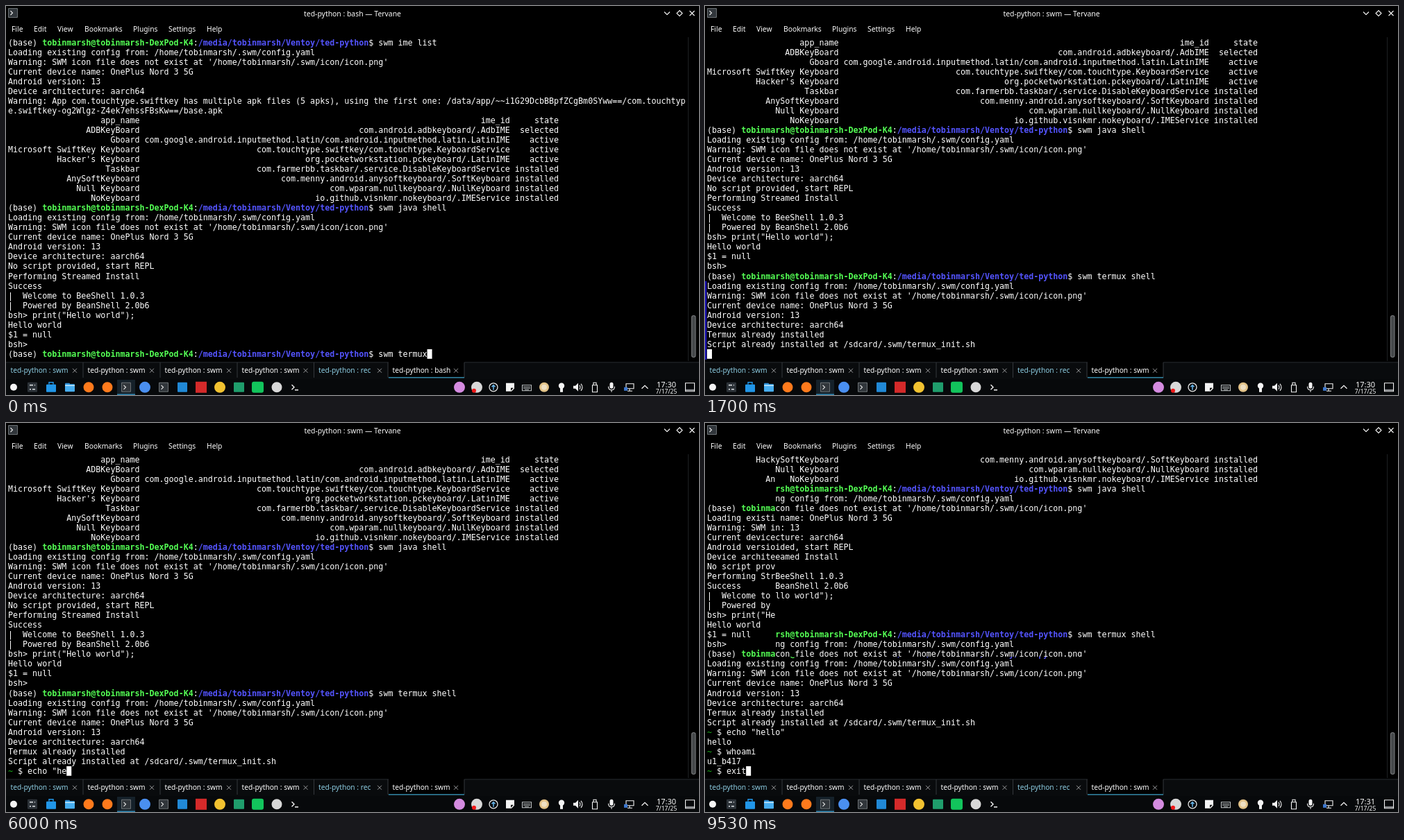
Write an HTML page with a canvas that moves like this. It is 998 px wide and 561 px high and loops after 9560 ms.

```html
<!DOCTYPE html>
<html lang="en">
<head>
<meta charset="utf-8">
<title>Terminal session</title>
<style>
  html, body { margin: 0; width: 100%; height: 100%; overflow: hidden; background: #000; }
  canvas { display: block; }
</style>
</head>
<body>
<canvas id="stage" width="998" height="561"></canvas>
<script>
const LOOP = 9560;
const W = 998, H = 561;
const ctx = document.getElementById('stage').getContext('2d');

const MONO = '"DejaVu Sans Mono", "Liberation Mono", monospace';
const SANS = '"Noto Sans", "Open Sans", sans-serif';
const CELL = 7.018, ROW = 14.03, LEFT = 3, TOP = 46, ROWS = 33;

// ---------- session text ----------
const USER = 'tobinmarsh', HOST = USER + '-DexPod-K4';
const CWD = '/media/' + USER + '/Ventoy/ted-python';
const prompt = cmd => `(base) ${USER}@${HOST}:${CWD}$ ${cmd}`;

const CONFIG = [
  `Loading existing config from: /home/${USER}/.swm/config.yaml`,
  `Warning: SWM icon file does not exist at '/home/${USER}/.swm/icon/icon.png'`
];
const DEVICE = [
  'Current device name: OnePlus Nord 3 5G',
  'Android version: 13',
  'Device architecture: aarch64'
];
const table = [
  ['app_name', 'ime_id', 'state  '.trim()],
  ['ADBKeyBoard', 'com.android.adbkeyboard/.AdbIME', 'selected'],
  ['Gboard', 'com.google.android.inputmethod.latin/com.android.inputmethod.latin.LatinIME', 'active'],
  ['Microsoft SwiftKey Keyboard', 'com.touchtype.swiftkey/com.touchtype.KeyboardService', 'active'],
  ["Hacker's Keyboard", 'org.pocketworkstation.pckeyboard/.LatinIME', 'active'],
  ['Taskbar', 'com.farmerbb.taskbar/.service.DisableKeyboardService', 'installed'],
  ['AnySoftKeyboard', 'com.menny.android.anysoftkeyboard/.SoftKeyboard', 'installed'],
  ['Null Keyboard', 'com.wparam.nullkeyboard/.NullKeyboard', 'installed'],
  ['NoKeyboard', 'io.github.visnkmr.nokeyboard/.IMEService', 'installed']
].map(([app, id, state]) => `${app.padStart(27)} ${id.padStart(75)} ${state.padStart(9)}`);

const HISTORY = [
  prompt('swm ime list'), ...CONFIG, ...DEVICE,
  'Warning: App com.touchtype.swiftkey has multiple apk files (5 apks), using the first one: /data/app/~~i1G29DcbBBpfZCgBm0SYww==/com.touchtyp',
  'e.swiftkey-og2Wlgz-Z4ek7ehssFBsKw==/base.apk',
  ...table,
  prompt('swm java shell'), ...CONFIG, ...DEVICE,
  'No script provided, start REPL',
  'Performing Streamed Install',
  'Success',
  '|  Welcome to BeeShell 1.0.3',
  '|  Powered by BeanShell 2.0b6',
  'bsh> print("Hello world");',
  'Hello world',
  '$1 = null',
  'bsh>',
  prompt('swm termux')
].join('\n');

// ---------- timeline ----------
const events = [];
const out = (at, text) => events.push([at, text]);
const type = (at, step, text) => [...text].forEach((c, i) => out(at + i * step, c));

type(100, 95, ' shell');
out(830, '\n');
out(930, CONFIG.join('\n') + '\n');
out(1230, DEVICE.join('\n') + '\n');
out(1430, 'Termux already installed\n');
out(1600, 'Script already installed at /sdcard/.swm/termux_init.sh\n');
out(2300, '~ $ ');
type(4930, 110, 'echo');
type(5530, 130, ' "he');
type(6130, 130, 'llo');
out(6530, '"');
out(6830, '\n');
out(6870, 'hello\n~ $ ');
type(7430, 140, 'wh');
type(7770, 110, 'oami');
out(8230, '\n');
out(8300, 'u1_b417\n~ $ ');
type(8600, 130, 'exit');

const SWM_TITLE = 1230, BAR_START = 930, BAR_END = 2300, MINUTE = 8770, TEAR = 9530;

// ---------- drawing helpers ----------
function rect(x, y, w, h, color) {
  ctx.fillStyle = color;
  ctx.fillRect(x, y, w, h);
}
function disc(x, y, r, color) {
  ctx.fillStyle = color;
  ctx.beginPath();
  ctx.arc(x, y, r, 0, 7);
  ctx.fill();
}
function box(x, y, w, h, r, color) {
  ctx.fillStyle = color;
  ctx.beginPath();
  ctx.roundRect(x, y, w, h, r);
  ctx.fill();
}
// Strokes an SVG path string around a centre.
function stroke(x, y, d, color = '#f4f4f4', width = 1.1) {
  ctx.save();
  ctx.translate(x, y);
  ctx.strokeStyle = color;
  ctx.lineWidth = width;
  ctx.stroke(new Path2D(d));
  ctx.restore();
}
function fillPath(x, y, d, color = '#f4f4f4') {
  ctx.save();
  ctx.translate(x, y);
  ctx.fillStyle = color;
  ctx.fill(new Path2D(d));
  ctx.restore();
}
function label(text, x, y, size, color = '#fcfcfc', align = 'left') {
  ctx.font = `${size}px ${SANS}`;
  ctx.textAlign = align;
  ctx.fillStyle = color;
  ctx.fillText(text, x, y);
}
function consoleIcon(x, y, s) {
  box(x - s, y - s, 2 * s, 2 * s, 1, '#6b7073');
  box(x - s + 1, y - s + 1, 2 * s - 2, 2 * s - 2, 1, '#31363b');
  stroke(x, y, 'M-3.5-3L-.5 0L-3.5 3', '#e8e8e8');
}

// ---------- terminal ----------
function runs(line) {
  if (line.startsWith('(base) ')) {
    const cut = line.indexOf('$');
    return [['(base) ', '#fff'], [`${USER}@${HOST}`, '#54ff54', 1], [':', '#fff'],
            [CWD, '#5454ff', 1], [line.slice(cut), '#fff']];
  }
  if (line.startsWith('~ $')) return [['~', '#18b218'], [line.slice(1), '#fff']];
  return [[line, '#fff']];
}

function drawLine(line, row) {
  const y = TOP + 10.8 + row * ROW;
  let col = 0;
  ctx.textAlign = 'left';
  for (const [text, color, bold] of runs(line)) {
    ctx.font = `${bold ? 'bold ' : ''}11.66px ${MONO}`;
    ctx.fillStyle = color;
    for (const c of text) {
      if (c !== ' ') ctx.fillText(c, LEFT + col * CELL, y);
      col++;
    }
  }
}

function drawTerminal(lines) {
  lines.slice(-ROWS).forEach(drawLine);
}

function drawScreen(lines, t) {
  drawTerminal(lines);
  const last = lines[lines.length - 1];
  rect(LEFT + last.length * CELL, TOP + (ROWS - 1) * ROW, CELL, 13.8, '#fff');

  if (t >= BAR_START && t < BAR_END) {
    const fresh = lines.length - ROWS;
    const y = TOP + (ROWS - fresh) * ROW;
    rect(0, y, 2.4, 510 - y, '#1c14b4');
  }
  if (t >= TEAR) {
    // Part of the screen has already scrolled on by two rows.
    ctx.save();
    ctx.beginPath();
    ctx.rect(101, 44, 880, 293);
    ctx.clip();
    rect(101, 44, 880, 293, '#000');
    drawTerminal([...lines, '', '']);
    ctx.restore();
  }
  rect(982, 45, 1, 467, '#1d2023');
  box(987, 446, 6.5, 61, 3.2, '#7a7c7e');
  box(988, 447, 4.5, 59, 2.2, '#45484a');
}

// ---------- window frame ----------
function drawWindow(task) {
  label(`ted-python : ${task} — Tervane`, 499, 14.6, 10.4, '#fcfcfc', 'center');
  consoleIcon(10, 10, 7);
  stroke(952, 10.5, 'M-4-2L0 2L4-2');
  stroke(970, 10.5, 'M0-4L4 0L0 4L-4 0Z');
  stroke(988, 10.5, 'M-3.5-3.5L3.5 3.5M3.5-3.5L-3.5 3.5');

  const menu = { File: 8, Edit: 40, View: 74, Bookmarks: 113, Plugins: 183, Settings: 234, Help: 289 };
  for (const name in menu) label(name, menu[name], 37.2, 10.3);
}

function drawTabs(task) {
  rect(0, 513, W, 25, '#090b0d');
  rect(0, 513.5, W, 1, '#24282c');
  rect(551, 513, 109, 23, '#000');
  const names = ['swm', 'swm', 'swm', 'swm', 'rec', task];
  const edges = [0, 111, 222, 333, 443.5, 550];
  names.forEach((name, i) => {
    const tinted = i === 0 || i === 4;
    const end = edges[i + 1] || 660;
    label(`ted-python : ${name}`, edges[i] + 6.5, 529.4, 10.2, tinted ? '#8ccbe0' : '#fcfcfc');
    stroke(end - 12, 525.8, 'M-3-3L3 3M3-3L-3 3', '#a6a8aa', 0.9);
    rect(end - 0.5, 514, 1, 22, '#34383c');
  });
  rect(551, 535, 109, 1.6, '#2f7f9c');
}

// ---------- taskbar ----------
function drawLaunchers(y) {
  disc(11, y, 5, '#f4f4f4');
  box(31, y - 7, 14, 14, 1, '#2d3339');
  stroke(38, y, 'M-4-3H1M3-3H4M-4 3H-2M0 3H4', '#dfe3e6', 1.5);
  box(58, y - 4, 14, 11, 1, '#2196e8');
  stroke(65, y - 4, 'M-3 0V-3H3V0', '#2196e8', 1.4);
  box(85, y - 6, 7, 4, 1, '#2a82c8');
  box(85, y - 4.5, 14, 11, 1, '#48aef0');
  rect(85, y - 3, 14, 1.2, '#d6eefc');
  disc(119, y, 7.5, '#ff7a1c');
  disc(146, y, 7.5, '#ff7a1c');
  rect(160, 539, 26, 22, '#15212a');
  rect(160, 559.5, 26, 1.5, '#2f87b4');
  consoleIcon(173, y, 7);
  disc(200, y, 8, '#4a8ff0');
  consoleIcon(227, y, 7);
  box(247, y - 7, 14, 14, 1, '#2189d6');
  box(273, y - 8, 16, 16, 0, '#d42a2a');
  disc(308, y, 8, '#f2c230');
  box(328, y - 7, 15, 14, 1, '#1f9d6c');
  box(354, y - 8, 17, 16, 3, '#12c45c');
  disc(390, y, 7.5, '#d8d8d8');
  stroke(416, y, 'M-4.5-3.5L-1 0L-4.5 3.5M0 4H5', '#f4f4f4', 1.4);
}

function drawTray(y) {
  disc(653, y, 8, '#d48be0');
  disc(678, y, 8, '#d8d8d8');
  disc(674, y + 5, 3, '#f01818');
  stroke(702, y, 'M6 0A6 6 0 1 1 -6 0A6 6 0 1 1 6 0', '#e8e8e8', 1.3);
  stroke(702, y, 'M0 4V-3M-2.5-.5L0-3L2.5-.5', '#69b8ee', 1.5);
  fillPath(726, y, 'M-6-6H6V2L2 6H-6Z');
  fillPath(726, y, 'M1 5V1H5Z', '#111');
  stroke(750, y + 1, 'M-6.5-4H6.5V4H-6.5Z', '#bfc2c4');
  stroke(750, y + 1, 'M-5-1.5H5M-5 .5H5M-3 2.5H3', '#bfc2c4', 0.9);
  disc(775, y, 7, '#e2c288');
  disc(775, y, 4, '#eedfc2');
  disc(800, y - 2, 4.2, '#f4f4f4');
  rect(798, y + 1, 4, 6, '#f4f4f4');
  fillPath(822, y, 'M-5-2H-2L2-6V6L-2 2H-5Z');
  stroke(824, y, 'M2-3Q4 0 2 3M4-5Q8 0 4 5');
  stroke(848, y, 'M-3.5-3H3.5V7H-3.5ZM-2-3V-6.5H2V-3');
  box(869.5, y - 7, 5, 9, 2.5, '#f4f4f4');
  stroke(872, y, 'M-4.5-1Q-4.5 4 0 4Q4.5 4 4.5-1M0 4V7');
  stroke(898, y, 'M-5-5H6V2H-5ZM0 2V5M-3 5.5H4');
  rect(890, y, 5, 5, '#3c78d0');
  stroke(920, y, 'M-4.5 2L0-2.5L4.5 2', '#f4f4f4', 1.3);
  stroke(985, y, 'M-6.5-6H6.5V6H-6.5Z');
  rect(979, y + 3, 12, 2.5, '#8a8d90');
}

function drawTaskbar(clock) {
  rect(0, 538, W, H - 538, '#07090b');
  drawLaunchers(549.8);
  drawTray(549.8);
  label(clock, 951, 549.6, 11, '#fcfcfc', 'center');
  label('7/17/25', 951, 559, 8.5, '#fcfcfc', 'center');
}

// ---------- loop ----------
let shown = '';

function render(t) {
  const text = HISTORY + events.filter(e => e[0] <= t).map(e => e[1]).join('');
  const task = t < SWM_TITLE ? 'bash' : 'swm';
  const clock = t < MINUTE ? '17:30' : '17:31';
  const key = [text.length, task, clock, t >= TEAR].join();
  if (key === shown) return;
  shown = key;

  rect(0, 0, W, H, '#000');
  drawScreen(text.split('\n'), t);
  drawWindow(task);
  drawTabs(task);
  drawTaskbar(clock);
}

const start = performance.now();
function tick() {
  render((performance.now() - start) % LOOP);
  requestAnimationFrame(tick);
}
tick();
</script>
</body>
</html>
```
